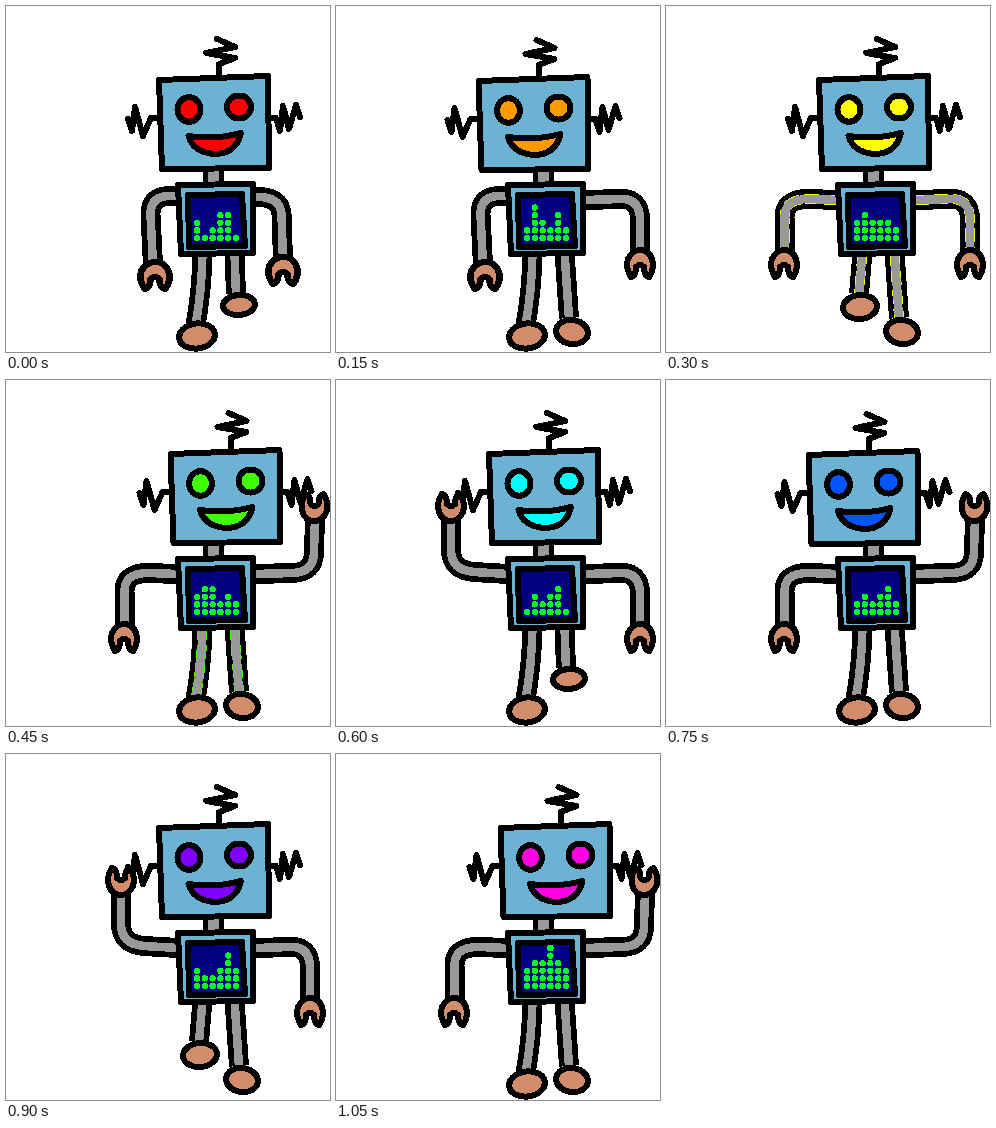
Recreate the animation shown at these times as an HTML page. Size 324 px wide and 346 px high, loop 1.2 s.

```html
<!DOCTYPE html>
<html lang="en">
<head>
<meta charset="utf-8">
<title>Dancing robot</title>
<style>
  html, body { margin: 0; width: 100%; height: 100%; overflow: hidden; background: #fff; }
  svg { display: block; width: 324px; height: 346px; shape-rendering: crispEdges; }
  .ink { stroke: #000; stroke-width: 6; stroke-linejoin: round; stroke-linecap: round; }
  .wire { fill: none; }
  .metal { fill: #6bb2d3; }
  .skin { fill: #d18c6c; }
  .limb { fill: none; }
</style>
</head>
<body>
<svg viewBox="0 0 324 346">
  <g id="limbs"></g>
  <path d="M199 162V178H215V162Z" fill="#999" class="ink" style="stroke-width:5"/>
  <path d="M172 179L247 178L247 247L175 248Z" class="ink metal"/>
  <path d="M182 189L236 188L239 240L183 241Z" class="ink" fill="#000080"/>
  <g id="bars" fill="#00ff1a"></g>
  <g id="head">
    <path d="M211 33L229 41L200 47L229 52L213 58V70" class="ink wire"/>
    <path d="M122 113L126 125L129 101L137 130L145 112H153" class="ink wire"/>
    <path d="M265 112H270L274 125L277 100L283 123L290 99L294 111" class="ink wire"/>
    <path d="M153 74L262 70L263 162L156 163Z" class="ink metal"/>
    <g id="face">
      <ellipse cx="183" cy="103.5" rx="11.5" ry="12.3" class="ink"/>
      <ellipse cx="233" cy="101" rx="12" ry="11.5" class="ink"/>
      <path d="M182.500 130Q209 134 235 127Q230 148 208 148Q187 146 182.500 130Z" class="ink"/>
    </g>
  </g>
  <g id="hands"></g>
</svg>
<script>
const LOOP = 1200, STEP = 150;
const $ = id => document.getElementById(id);

// Each arm: centre line, hand position, hand turn, hand spread
const ARMS = {
  leftHang:  ['M172 190H162Q144 191 144.500 209L147 259', 149, 270, 0, 1.13],
  leftOut:   ['M172 194L142 193Q118 193 118.500 212V246', 118, 258, 0, 1],
  leftUp:    ['M172 194L138 192Q115 190 115 170V140', 115, 127, 180, 1],
  rightHang: ['M249 191Q274 190 275.500 208L277 254', 277, 265, 0, 1.13],
  rightOut:  ['M249 194L286 193Q303 193 304 212L304 246', 304, 258, 0, 1],
  rightUp:   ['M249 194L287 193Q308 192 308 172L309 138', 308.5, 127, 180, 1]
};

// Each leg: centre line, then foot centre, radii and turn
const LEGS = {
  leftDown:  ['M196.500 246Q196 285 189 322', 191, 330, 18, 12.5, -8],
  leftUp:    ['M196.500 246L193 288', 194, 301, 17, 12, -5],
  rightDown: ['M228.500 246L233 312', 236, 326, 16, 12, 8],
  rightUp:   ['M228.500 246L230 288', 233, 299, 16, 10, -4]
};

const CENTRE = [0, 0], LEFT = [-10.5, 1], RIGHT = [11.5, 0];

const STEPS = [
  { color: '#ff0000', head: CENTRE, arms: ['Hang', 'Hang'], legs: ['Down', 'Up'], bars: [3, 1, 2, 4, 4, 1] },
  { color: '#ff9900', head: LEFT, arms: ['Hang', 'Out'], legs: ['Down', 'Down'], bars: [2, 5, 3, 2, 4, 2] },
  { color: '#ffff00', head: CENTRE, arms: ['Out', 'Out'], legs: ['Up', 'Down'], bars: [3, 4, 3, 3, 3, 2], armGlow: true, legGlow: true },
  { color: '#40ff00', head: RIGHT, arms: ['Out', 'Up'], legs: ['Down', 'Down'], bars: [3, 4, 4, 2, 3, 2], legGlow: true },
  { color: '#00ffff', head: CENTRE, arms: ['Up', 'Out'], legs: ['Down', 'Up'], bars: [1, 3, 2, 3, 4, 1] },
  { color: '#0055ff', head: LEFT, arms: ['Out', 'Up'], legs: ['Down', 'Down'], bars: [2, 3, 2, 3, 4, 2] },
  { color: '#8000ff', head: CENTRE, arms: ['Up', 'Out'], legs: ['Up', 'Down'], bars: [3, 2, 2, 3, 5, 3] },
  { color: '#ff00e6', head: RIGHT, arms: ['Out', 'Up'], legs: ['Down', 'Down'], bars: [3, 4, 4, 6, 4, 3] }
];

const stroke = (d, color, width, extra = '') =>
  `<path d="${d}" class="limb" stroke="${color}" stroke-width="${width}" ${extra}/>`;

const limb = (d, glow) =>
  stroke(d, '#000', 20) +
  (glow ? stroke(d, glow, 10, 'stroke-dasharray="14 5"') : '') +
  stroke(d, '#999', 8.5);

const hand = ([, x, y, turn, spread]) =>
  `<path transform="translate(${x} ${y}) rotate(${turn}) scale(${spread} 1)" class="ink skin"
    d="M-9 13Q-15 3 -12 -5Q-8 -14 0 -14Q9 -14 12 -5Q15 4 9 13Q4 12 4 3Q0 -1 -4 3Q-4 12 -9 13Z"/>`;

const foot = ([, x, y, rx, ry, turn]) =>
  `<ellipse transform="translate(${x} ${y}) rotate(${turn})" rx="${rx}" ry="${ry}" class="ink skin"/>`;

const column = (height, i) => Array.from({ length: height }, (_, row) =>
  `<circle cx="${191 + i * 7.8}" cy="${232 - row * 7.6}" r="3.200"/>`).join('');

const pick = (parts, [left, right]) => [parts['left' + left], parts['right' + right]];

function draw({ color, head, arms, legs, bars, armGlow, legGlow }) {
  const armParts = pick(ARMS, arms), legParts = pick(LEGS, legs);
  $('limbs').innerHTML =
    legParts.map(leg => limb(leg[0], legGlow && color) + foot(leg)).join('') +
    armParts.map(arm => limb(arm[0], armGlow && color)).join('');
  $('hands').innerHTML = armParts.map(hand).join('');
  $('bars').innerHTML = bars.map(column).join('');
  $('head').setAttribute('transform', `translate(${head})`);
  $('face').setAttribute('fill', color);
}

let shown = -1;
function tick() {
  const index = Math.floor(performance.now() % LOOP / STEP);
  if (index !== shown) draw(STEPS[shown = index]);
  requestAnimationFrame(tick);
}
tick();
</script>
</body>
</html>
```
